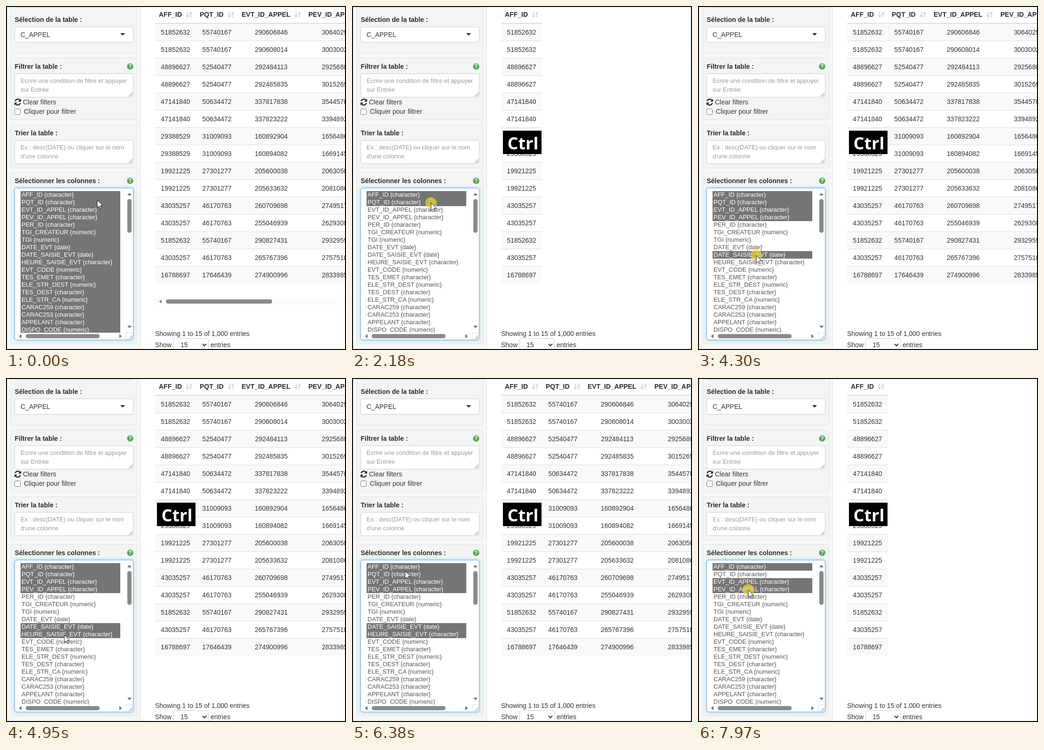
Write an HTML page that moves like this. It is 723 px wide and 734 px high and loops after 8000 ms.

```html
<!DOCTYPE html>
<html lang="fr">
<head>
<meta charset="utf-8">
<title>Sélection de colonnes</title>
<style>
html, body { margin: 0; width: 100%; height: 100%; overflow: hidden; background: #fff; }
svg { display: block; width: 723px; height: 734px; font: 14px "Liberation Sans", Arial, sans-serif; }
text { fill: #333; white-space: pre; }
.bold { font-weight: 700; fill: #2b2b2b; }
.hint { font-size: 13px; fill: #999; }
.option { font-size: 13px; fill: #555; }
.option.on { fill: #fff; }
.mid { text-anchor: middle; }
.mark { font-size: 12px; font-weight: 700; fill: #fff; text-anchor: middle; }
.key { font: 700 36px "Open Sans", "Noto Sans", sans-serif; fill: #fff; text-anchor: middle; }
.focus { filter: drop-shadow(0 0 3px rgba(102, 175, 233, .65)); }
</style>
</head>
<body>
<svg id="stage" viewBox="0 0 723 734"></svg>
<script>
const LOOP = 8000;
const stage = document.getElementById('stage');

function add(parent, tag, attrs = {}, content) {
  const node = document.createElementNS('http://www.w3.org/2000/svg', tag);
  for (const name in attrs) node.setAttribute(name, attrs[name]);
  if (content !== undefined) node.textContent = content;
  parent.appendChild(node);
  return node;
}
const group = (parent = stage) => add(parent, 'g');
const label = (parent, x, y, content, cls = '') => add(parent, 'text', { x, y, class: cls }, content);
const rect = (parent, x, y, width, height, fill, more = {}) =>
  add(parent, 'rect', { x, y, width, height, fill, ...more });
const path = (parent, d, more = {}) => add(parent, 'path', { d, ...more });
const line = (parent, d, stroke, width = 1) => path(parent, d, { fill: 'none', stroke, 'stroke-width': width });
const show = (node, visible) => node.setAttribute('visibility', visible ? 'visible' : 'hidden');

// Sidebar
const field = (y, height, more = {}) =>
  rect(stage, 18.5, y + .5, 252, height, '#fff', { stroke: '#ccc', rx: 4, ...more });
const grip = y => line(stage, `M261 ${y}l8 -8M265 ${y}l4 -4`, '#666');

function panel(top, bottom, title, helped) {
  rect(stage, 10.5, top + .5, 268, bottom - top, '#f3f5f5', { stroke: '#e3e5e5', rx: 4 });
  label(stage, 18.5, top + 23, title, 'bold');
  if (!helped) return;
  add(stage, 'circle', { cx: 264, cy: top + 18, r: 6.7, fill: '#53a653' });
  label(stage, 264, top + 22.3, '?', 'mark');
}
function textArea(y, ...lines) {
  field(y, 50);
  lines.forEach((words, i) => label(stage, 31, y + 20 + 19 * i, words, 'hint'));
  grip(y + 49);
}
function sidebar() {
  rect(stage, 0, 0, 286, 734, '#f5f7f7');
  rect(stage, 286, 0, 1, 734, '#e3e5e5');

  panel(11, 100, 'Sélection de la table :');
  rect(stage, 10, 0, 269, 13, '#f3f5f5');
  line(stage, 'M10.5 0v20M278.5 0v20', '#e3e5e5');
  field(-30, 33);
  field(44, 33);
  label(stage, 31, 66, 'C_APPEL');
  path(stage, 'M243 58h10l-5 5z', { fill: '#222' });

  panel(111, 242, 'Filtrer la table :', true);
  textArea(144, 'Ecrire une condition de filtre et appuyer', 'sur Entrée');
  line(stage, 'M19.5 203a5.7 5.7 0 0 1 10 -2.2M30.5 207a5.7 5.7 0 0 1 -10 2.2', '#222', 2.3);
  path(stage, 'M32 198v6h-6zM18 212v-6h6z', { fill: '#222' });
  label(stage, 36, 210, 'Clear filters');
  rect(stage, 18.5, 219.5, 12, 12, '#fff', { stroke: '#767676', rx: 2 });
  label(stage, 38, 230, 'Cliquer pour filtrer');

  panel(253, 345, 'Trier la table :');
  textArea(286, 'Ex : desc(DATE) ou cliquer sur le nom', "d'une colonne");

  panel(355, 720, 'Sélectionner les colonnes :', true);
  field(388, 324, { stroke: '#66afe9', class: 'focus' });
}

// Column list
const OPTIONS = `AFF_ID c,PQT_ID c,EVT_ID_APPEL c,PEV_ID_APPEL c,PER_ID c,TGI_CREATEUR n,TGI n,DATE_EVT d,
DATE_SAISIE_EVT d,HEURE_SAISIE_EVT c,EVT_CODE n,TES_EMET c,ELE_STR_DEST n,TES_DEST c,ELE_STR_CA n,
CARAC259 c,CARAC253 c,APPELANT c,DISPO_CODE n`.split(/,\s*/);
const TYPES = { c: 'character', n: 'numeric', d: 'date' };
const optionY = row => 395 + 16 * row;

function optionList() {
  const clip = add(add(stage, 'defs'), 'clipPath', { id: 'list' });
  rect(clip, 19, 389, 238, 308);
  const list = add(stage, 'g', { 'clip-path': 'url(#list)' });
  const items = OPTIONS.map((option, i) => {
    const [name, type] = option.split(' ');
    const bar = rect(list, 31, optionY(i), 212, 16, '#757575');
    return { bar, text: label(list, 33, optionY(i) + 12, `${name} {${TYPES[type]}}`, 'option') };
  });
  rect(stage, 258, 412, 9, 72, '#8a8a8a', { rx: 4.5 });
  rect(stage, 42, 700, 157, 9, '#8a8a8a', { rx: 4.5 });
  path(stage, 'M258 404h9l-4.5 -5.5zM258 682h9l-4.5 5.5zM33 700v9l-5.5 -4.5zM241 700v9l5.5 -4.5z',
    { fill: '#757575' });
  line(stage, 'M255.5 712v-14.5h14.5', '#ddd');
  grip(711);
  return items;
}

// Data table: every case (a to g) has two ids, and calls come in the order of CALLS
const CASES = {
  a: ['51852632', '55740167'],
  b: ['48896627', '52540477'],
  c: ['47141840', '50634472'],
  d: ['29388529', '31009093'],
  e: ['19921225', '27301277'],
  f: ['43035257', '46170763'],
  g: ['16788697', '17646439']
};
const CALLS = `a290606846 a290608014 b292484113 b292485835 c337817838 c337823222 d160892904 d160894082
e205600038 e205633632 f260709698 f255046939 a290827431 f265767396 g274900996`.split(/\s+/);
const noise = n => Math.abs(Math.sin(n * 12.9898) * 43758.5453) % 1;
const ROWS = CALLS.map(call => {
  const id = call.slice(1);
  return [...CASES[call[0]], id, Math.round(id * (1 + .06 * noise(+id % 97)))];
});
const LEFT = 317, ROW = 37;
const COLUMNS = [[404, 'AFF_ID'], [493, 'PQT_ID'], [635, 'EVT_ID_APPEL'], [778, 'PEV_ID_APPEL']]
  .map(([right, name], i, all) => ({ name, right, left: i ? all[i - 1][0] : LEFT }));

function dataTable() {
  const all = group();
  const bands = ROWS.flatMap((_, i) => {
    const y = 38 + ROW * i;
    return [
      rect(all, LEFT, y, 0, ROW, i % 2 ? '#fff' : '#f9f9f9'),
      rect(all, LEFT, y - (i ? 1 : 2), 0, i ? 1 : 2, '#ddd')
    ];
  });
  const columns = COLUMNS.map(({ name, left, right }, c) => {
    const column = group(all);
    label(column, left + 8, 23, name, 'bold');
    line(column, `M${right - 18} 12v11m-3 -3.5l3 4l3 -4m4 5.5v-11m-3 3.5l3 -4l3 4`, '#d8d8d8', 2);
    ROWS.forEach((row, i) => label(column, (left + right) / 2, 61 + ROW * i, row[c], 'mid'));
    return column;
  });

  label(all, LEFT, 704, 'Showing 1 to 15 of 1,000 entries');
  label(all, LEFT, 728, 'Show');
  rect(all, 356.5, 709.5, 74, 30, '#fff', { stroke: '#ccc', rx: 4 });
  label(all, 371, 728, '15');
  line(all, 'M418 721l4 4l4 -4', '#333', 2);
  label(all, 435, 728, 'entries');

  const scroll = group();
  rect(scroll, LEFT, 622, 406, 17, '#fcfcfc');
  rect(scroll, 340, 626, 226, 9, '#8a8a8a', { rx: 4.5 });
  path(scroll, 'M331 626v9l-5.5 -4.5z', { fill: '#8a8a8a' });
  return { all, bands, columns, scroll };
}

sidebar();
const items = optionList();
const table = dataTable();

const keyBox = group();
rect(keyBox, 321, 266, 82, 50, '#000');
label(keyBox, 363.5, 306, 'Ctrl', 'key');

const halo = add(stage, 'circle', { r: 12, fill: '#e6da32', opacity: .72 });
const cursor = path(stage, 'M0 0V16.5L3.9 12.9L6.4 18.8L8.9 17.7L6.4 12H11.5Z',
  { fill: '#fff', stroke: '#111', 'stroke-width': 1, 'stroke-linejoin': 'round' });
rect(stage, 1, 1, 721, 732, 'none', { stroke: '#000', 'stroke-width': 2 });

// Timeline: the cursor glides to an option between `from` and `to`, and may click there
const START = { x: 194, y: 414 };
const STEPS = [
  { from: 50, to: 350, x: 191, row: 0 },
  { from: 560, to: 760, x: 191, row: 0, click: 960 },
  { from: 1380, to: 1830, x: 168, row: 1, click: 2180 },
  { from: 2400, to: 2700, x: 161, row: 2, click: 2920 },
  { from: 3120, to: 3380, x: 157, row: 3, click: 3580 },
  { from: 3790, to: 4050, x: 124, row: 8, click: 4300 },
  { from: 4480, to: 4650, x: 124, row: 9, click: 4850 },
  { from: 5780, to: 6480, x: 115, row: 0, bend: -16, click: 7050 },
  { from: 7250, to: 7670, x: 107, row: 2, click: 7870 },
  { from: 7870, to: 7965, x: 107, row: 3, click: 7965 }
];
const PRESS = 100, BLANK = 150, RELOADED = 195;
const ctrlHeld = t => (t >= 1500 && t < 6600) || t >= 7450;
const clicksUntil = t => STEPS.filter(step => step.click <= t);

function cursorAt(t) {
  let { x, y } = START;
  for (const { from, to, x: goalX, row, bend = 0 } of STEPS) {
    const k = Math.min(1, Math.max(0, (t - from) / (to - from)));
    const eased = k * k * (3 - 2 * k);
    x += (goalX - x) * eased + bend * Math.sin(Math.PI * eased);
    y += (optionY(row) + 9 - y) * eased;
  }
  return { x, y };
}

// A click with Ctrl extends the selection, a plain one replaces it
function selectionAt(t) {
  return clicksUntil(t).reduce(
    (chosen, { click, row }) => ctrlHeld(click) ? [...chosen, row] : [row],
    [...OPTIONS.keys()]);
}

function render(t) {
  const chosen = selectionAt(t);
  items.forEach(({ bar, text }, i) => {
    const on = chosen.includes(i);
    show(bar, on);
    text.setAttribute('class', on ? 'option on' : 'option');
  });

  const cols = Math.min(COLUMNS.length, selectionAt(t - RELOADED).length);
  const blank = clicksUntil(t - BLANK).length > clicksUntil(t - RELOADED).length;
  table.all.setAttribute('display', blank ? 'none' : 'inline');
  table.columns.forEach((column, i) => show(column, i < cols));
  table.bands.forEach(band => band.setAttribute('width', COLUMNS[cols - 1].right - LEFT));
  show(table.scroll, !clicksUntil(t - BLANK).length);

  show(keyBox, ctrlHeld(t));
  const { x, y } = cursorAt(t);
  cursor.setAttribute('transform', `translate(${x.toFixed(1)} ${y.toFixed(1)})`);
  halo.setAttribute('cx', x);
  halo.setAttribute('cy', y);
  show(halo, clicksUntil(t).length > clicksUntil(t - PRESS).length);
}

const start = performance.now();
function tick() {
  render((performance.now() - start) % LOOP);
  requestAnimationFrame(tick);
}
tick();
</script>
</body>
</html>
```
